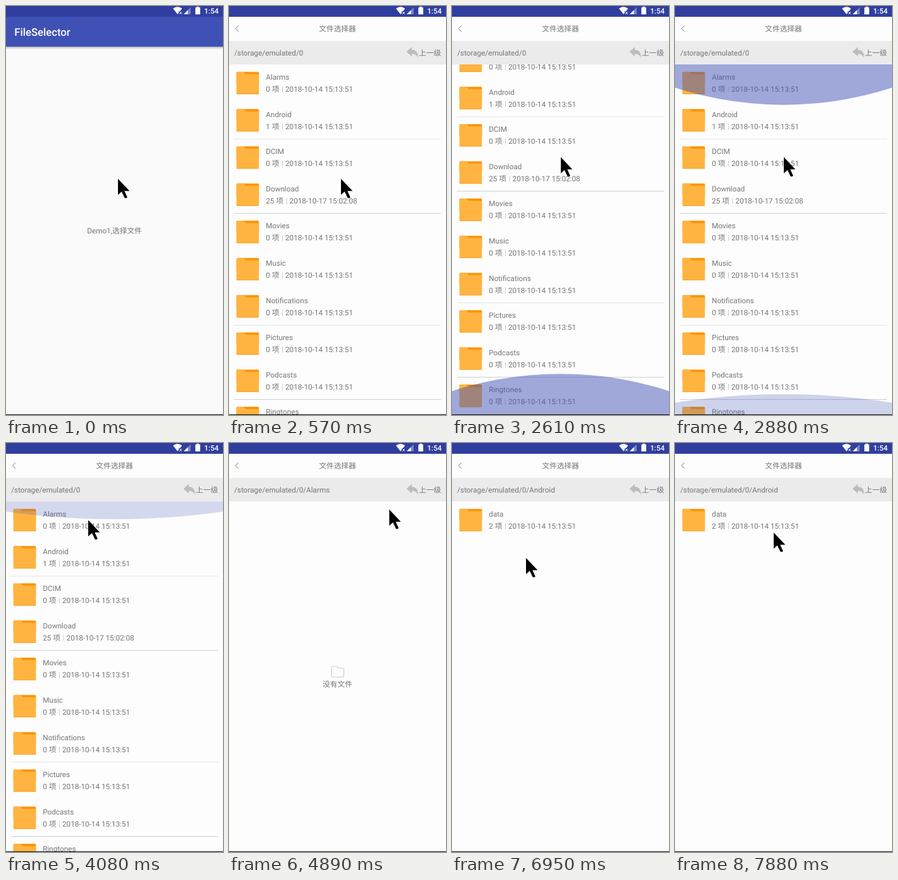
Recreate the animation shown at these times as an HTML page. Size 343 by 644 pixels, loop 8000 ms.

```html
<!DOCTYPE html>
<html lang="zh-CN">
<head>
<meta charset="utf-8">
<style>
html, body { margin: 0; width: 100%; height: 100%; overflow: hidden; background: #fafafa; }
svg { display: block; width: 343px; height: 644px; }
text {
  font: 11.7px Roboto, "Noto Sans CJK SC", "Noto Sans CJK", sans-serif;
  fill: #757575; white-space: pre; text-rendering: geometricPrecision;
}
.mid { text-anchor: middle; }
.bold { font-weight: 500; fill: #fff; }
</style>
</head>
<body>
<svg viewBox="0 0 343 644">
  <defs>
    <clipPath id="view"><rect y="92" width="343" height="551"/></clipPath>
    <linearGradient id="shade" x2="0" y2="1">
      <stop stop-color="#000" stop-opacity=".28"/><stop offset="1" stop-color="#000" stop-opacity="0"/>
    </linearGradient>
    <g id="folder">
      <rect x="11.7" y="103.7" width="35.6" height="20" rx="1.5" fill="#fb9505"/>
      <path d="M11.7 105Q11.7 103.7 13 103.7H23L26.5 107.5H47.3V139H11.7Z" fill="#ffb441"/>
      <path d="M12.5 138.5H46.5" stroke="#f9a42a"/>
    </g>
  </defs>

  <rect width="343" height="644" fill="#fafafa"/>
  <rect y="17" width="343" height="47" fill="#3f51b5"/>
  <rect y="64" width="343" height="4" fill="url(#shade)"/>
  <text class="bold" x="13.3" y="47" style="font-size:16.7px">FileSelector</text>
  <text class="mid" x="171.5" y="358">Demo1,选择文件</text>

  <g id="picker">
    <rect y="17" width="343" height="627" fill="#fdfdfd"/>
    <path d="M15 30.8L10.2 35.5L15 40.2" fill="none" stroke="#777"/>
    <text class="mid" x="171.5" y="40">文件选择器</text>
    <rect y="55" width="343" height="37" fill="#ebebeb"/>
    <rect id="press" x="280" y="55" width="55.5" height="37" opacity=".08"/>
    <text id="path" x="8.3" y="78"></text>
    <path d="M280.5 72L289 64.5V69C296 69 299.3 74 298.7 82C297 77.3 294 75.5 289 75.5V79.5Z" fill="#bdbdbd"/>
    <text x="300" y="78">上一级</text>
    <g clip-path="url(#view)">
      <g id="root"></g>
      <g id="sub"></g>
      <g id="empty">
        <path d="M164 351.5H169.5L172.5 354.5H179.5Q181.5 354.5 181.5 356.5V366.5Q181.5 368.5 179.5 368.5H164Q162 368.5 162 366.5V353.5Q162 351.5 164 351.5Z" fill="none" stroke="#ccc" stroke-width="1.2"/>
        <text class="mid" x="171.5" y="384">没有文件</text>
      </g>
      <ellipse id="top" cx="171.5" rx="514" fill="#3f51b5"/>
      <ellipse id="bottom" cx="171.5" rx="514" fill="#3f51b5"/>
    </g>
  </g>

  <rect width="343" height="17" fill="#303f9f"/>
  <g fill="#fff">
    <path d="M264 4Q271 -1.5 278.3 4L275 8.2H273V10.8L271.2 13Z"/>
    <path d="M274.2 9.2L277.8 12.8M277.8 9.2L274.2 12.8" stroke="#fff"/>
    <path d="M281 13H292V2Z" opacity=".35"/>
    <path d="M281 13H287.5V6.5Z"/>
    <path d="M299.3 2.2H301.3V1H305V2.2H307V13.2H299.3Z"/>
  </g>
  <text class="bold" x="313.2" y="12">1:54</text>
  <rect y="643" width="343" height="1" fill="#111"/>
  <path id="cursor" d="M0 0V25.5L5.8 20.2L10.5 30Q12.5 31.5 14.8 29.3L10.2 19.3H18.3Z"/>
</svg>
<script>
const $ = id => document.getElementById(id);
const ROW = 58.6, LOOP = 8000;

function row(name, count, i, date = '2018-10-14 15:13:51') {
  const x = 79 + 6.58 * (String(count).length - 1);
  return `<g transform="translate(0 ${i * ROW})"><use href="#folder"/>
    <text x="58.3" y="116">${name}</text>
    <text x="58.3" y="135">${count} 项</text>
    <path d="M${x + 5.5} 126.5V136" stroke="#ccc"/>
    <text x="${x + 10}" y="135">${date}</text></g>`;
}

const names = 'Alarms Android DCIM Download Movies Music Notifications Pictures Podcasts Ringtones'.split(' ');
const rows = names.map((name, i) => name === 'Download'
  ? row(name, 25, i, '2018-10-17 15:02:08')
  : row(name, name === 'Android' ? 1 : 0, i));
const dividers = [2, 4, 7, 9].map((n, i) =>
  `<path d="M8 ${Math.floor(92 + n * ROW)}.5H335" stroke="${i % 2 ? '#cfcfcf' : '#e5e5e5'}"/>`);
$('root').innerHTML = rows.concat(dividers).join('');
$('sub').innerHTML = row('data', 2, 0);

// Pointer moves: start, end, x, y
const moves = [[2090, 2100, 172, 238], [3900, 4080, 130, 121.5], [4880, 4890, 253, 105],
  [4890, 5260, 317, 71], [5810, 6100, 130, 144.5], [6100, 6520, 117, 181],
  [6980, 7100, 148, 129], [7130, 7610, 281, 93], [7640, 7880, 156, 141]];

const ramp = (t, from, to) => Math.min(1, Math.max(0, (t - from) / (to - from)));
const easeOut = p => p * (2 - p);
const within = (t, from, to) => t >= from && t < to;
const show = (id, on) => $(id).style.display = on ? '' : 'none';

function pointer(t) {
  let x = 177, y = 272;
  for (const [from, to, endX, endY] of moves) {
    const p = easeOut(ramp(t, from, to));
    x += (endX - x) * p;
    y += (endY - y) * p;
  }
  return [x, y];
}

// Overscroll glow: swells to its full height, then shrinks and fades
function glow(id, edge, dir, max, t, start, peak, end) {
  const rise = 1 - (1 - ramp(t, start, peak)) ** 7;
  const fall = (1 - ramp(t, peak, end)) ** 2;
  const h = max * rise * fall, ry = 514 * h / 69;
  $(id).setAttribute('ry', ry);
  $(id).setAttribute('cy', edge + dir * (h - ry));
  $(id).setAttribute('opacity', Math.min(.5, h / 129));
}

function draw(now) {
  const t = now % LOOP;
  const enter = t < 300 ? 0 : easeOut(ramp(t, 200, 560));
  const dir = within(t, 4320, 5670) ? '/Alarms' : t >= 6800 ? '/Android' : '';
  $('picker').setAttribute('opacity', enter);
  $('picker').setAttribute('transform', `translate(0 ${30 * (1 - enter)})`);
  $('path').textContent = '/storage/emulated/0' + dir;
  show('root', !dir);
  show('empty', dir === '/Alarms');
  show('sub', dir === '/Android');
  show('press', within(t, 5400, 5670));
  $('root').setAttribute('transform', `translate(0 ${within(t, 2220, 2760) ? -35 : 0})`);
  glow('top', 92, 1, 84, t, 2760, 3420, 4980);
  glow('bottom', 643, -1, 64, t, 2220, 2610, 3530);
  $('cursor').setAttribute('transform', `translate(${pointer(t)})`);
  requestAnimationFrame(draw);
}
draw(0);
</script>
</body>
</html>
```
